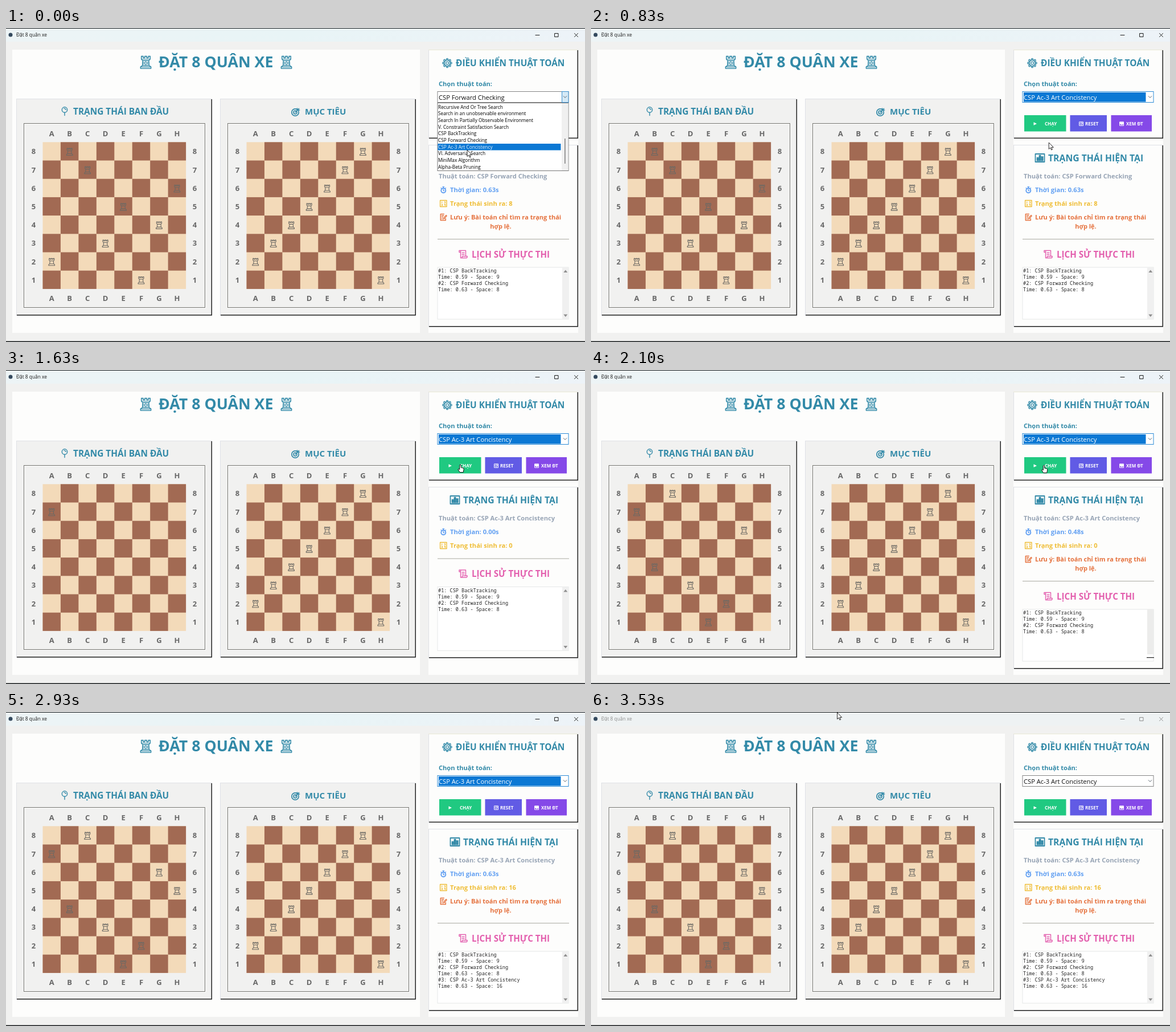
An HTML page for the animation above (3.56 s loop, 1017x551 px).

```html
<!DOCTYPE html>
<html lang="vi">
<head>
<meta charset="utf-8">
<title>Đặt 8 quân xe</title>
<style>
  html, body { margin: 0; width: 100%; height: 100%; overflow: hidden; background: #f1f1f0; }
  svg { display: block; width: 1017px; height: 551px; }
  text { font-family: "Open Sans", "Noto Sans", sans-serif; white-space: pre; }
  .b { font-weight: 700; }
  .m { font-family: "Noto Sans Mono", "DejaVu Sans Mono", monospace; }
  .icon { fill: none; stroke-width: 1.4; stroke-linejoin: round; stroke-linecap: round; }
</style>
</head>
<body>
<svg viewBox="0 0 1017 551">
  <defs>
    <linearGradient id="bar"><stop offset="0" stop-color="#edf4f6"/><stop offset=".5" stop-color="#e8f4f6"/><stop offset="1" stop-color="#edf3f8"/></linearGradient>
    <path id="rook" d="M-4.5-6.2V-3.2L-3.1-1.8L-3.4 3.2L-5.3 4.6V6.2H5.3V4.6L3.4 3.2L3.1-1.8L4.5-3.2V-6.2H2.6V-4.6H1V-6.2H-1V-4.6H-2.6V-6.2ZM-3.1-1.8H3.1M-3.4 3.2H3.4"/>
    <path id="bricks" d="M-4-3.2H4M-3.2 0H3.2M-3.3 1.6H3.3M0-1.8V0M-1.5 0V1.6M1.5 0V1.6M0 1.6V3.2M-4.5 4.7H4.5"/>
  </defs>
  <g id="scene"></g>
  <g id="cursor" fill="#fff" stroke="#111" stroke-width="1" stroke-linejoin="round">
    <path id="arrow" d="M0 0V11.5L2.7 9 4.4 13 6.2 12.2 4.5 8.4H8.1Z" stroke-width=".9"/>
    <path id="hand" d="M-1.2 1Q0-.8 1.2 1V5.2L5 6Q6.3 6.4 6.2 8L5.2 13.5H-.8L-3.8 8.8Q-3.6 7.2-2.2 7.8L-1.2 8.8Z"/>
  </g>
</svg>
<script>
const LOOP = 3560, OPEN_END = 700, RUN = 1630, STEP = 75, NOTE = 2070, REPAINT = 2150, DONE = 2235, BLUR = 3400;
const TEAL = "#338aa8", PINK = "#e35fae", GREY = "#686868", BLUE = "#62a0f2", GOLD = "#efbd35", ORANGE = "#e5713d";
const START = "28735146", GOAL = "23456781", FOUND = "74831265";
const ITEMS = ["Recursive And Or Tree Search", "Search in an unobservable environment",
  "Search In Partially Observable Environment", "V. Constraint Satisfaction Search", "CSP BackTracking",
  "CSP Forward Checking", "CSP Ac-3 Art Concistency", "VI. Adversarial Search", "MiniMax Algorithm", "Alpha-Beta Pruning"];
const OLD = ITEMS[5], NEW = ITEMS[6];

const rect = (x, y, w, h, fill) => `<rect x="${x}" y="${y}" width="${w}" height="${h}" fill="${fill}"/>`;
const text = (x, y, size, fill, str, cls = "", anchor = "start") =>
  `<text x="${x}" y="${y}" font-size="${size}" fill="${fill}" class="${cls}" text-anchor="${anchor}">${str}</text>`;
const bold = (x, y, size, fill, str, anchor) => text(x, y, size, fill, str, "b", anchor);
const icon = (x, y, color, body) => `<g class="icon" transform="translate(${x} ${y})" stroke="${color}">${body}</g>`;
const path = (d, extra = "") => `<path d="${d}" ${extra}/>`;
const circle = (x, y, r, extra = "") => `<circle cx="${x}" cy="${y}" r="${r}" ${extra}/>`;

// Raised box: pale top and left edges, dark right and bottom edges
function raised(x, y, w, h, fill) {
  return rect(x, y, w, h, "#dfe1e6") + rect(x + 1, y + 1, w - 1, h - 1, "#222") +
    rect(x + 1, y + 1, w - 2.5, h - 2.5, fill);
}

function groove(x, y, w, h) {
  return rect(x, y, w, h, "#fff") + rect(x, y, w - 1, h - 1, "#74746f") +
    rect(x + 1, y + 1, w - 3, h - 3, "#fff") + rect(x + 2, y + 2, w - 4, h - 4, "#f1f1f0");
}

function board(x0, rows, count) {
  const cw = 31.45, ch = 32.2, y0 = 200.3;
  let out = rect(x0, y0, cw * 8, ch * 8, "#f3dab9"), dark = "";
  for (let i = 0; i < 8; i++) {
    const cx = x0 + (i + .5) * cw, cy = y0 + (i + .5) * ch;
    for (let j = 0; j < 8; j++)
      if ((i + j) % 2) dark += rect(x0 + i * cw, y0 + j * ch, cw, ch, "#a26a53");
    for (const y of [189.6, 479]) out += bold(cx, y, 13, GREY, "ABCDEFGH"[i], "middle");
    for (const x of [x0 - 16, x0 + 267]) out += bold(x, cy + 5, 13, GREY, 8 - i, "middle");
  }
  out += dark;
  for (let i = 0; i < count; i++) {
    const x = x0 + (i + .5) * cw, y = y0 + (8.53 - rows[i]) * ch;
    out += icon(x, y, "#6b6964", `<use href="#rook" stroke-width="1.1"/>`);
  }
  return out;
}

function titleBar(active) {
  const ink = active ? "#1b1b1b" : "#8d8d8d";
  return rect(0, 0, 1017, 24, active ? "url(#bar)" : "#eef2f3") + rect(0, 0, 1017, 1, "#15181a") +
    rect(0, 549.5, 1017, 1.5, "#15181a") + circle(8, 12, 3.5, 'fill="#34495e"') +
    text(18, 15.2, 8.4, ink, "Đặt 8 quân xe") +
    icon(0, 0, ink, `<g stroke-width="1">${path("M930 12.5H937M964 9.5H970V15.5H964ZM998.5 9.5L1004.5 15.5M1004.5 9.5L998.5 15.5")}</g>`);
}

function leftSide(rows, count) {
  let out = rect(11, 38, 716, 497, "#fdfdfc");
  for (const x of [245.5, 492.5])
    out += icon(x, 60.3, TEAL, `<g transform="scale(1.72)" stroke-width=".9"><use href="#rook"/><use href="#bricks" stroke-width=".6"/></g>`);
  out += bold(368.7, 69.2, 26.7, TEAL, "ĐẶT 8 QUÂN XE", "middle");
  for (const x of [18, 376]) out += raised(x, 124, 344, 380.5, "#f1f1f0") + groove(x + 13, 167, 320, 325);
  out += icon(103, 146, TEAL, circle(0, -2.5, 4.7) + path("M0 2.5V7.5M-1-4.6Q1.8-5 2.2-2.5"));
  out += bold(118, 152, 15.4, TEAL, "TRẠNG THÁI BAN ĐẦU");
  out += icon(508.5, 147, TEAL, `<g stroke-width="1.7">${circle(-.5, 1, 6.2) + circle(-.5, 1, 3) + path("M-.5 1L6-5.5M3-6V-3H7")}</g>`);
  out += bold(525, 152, 15, TEAL, "MỤC TIÊU");
  return out + board(64.5, rows, count) + board(422.5, GOAL, 8);
}

function button(x, w, fill, textX, label, mark) {
  return rect(x, 153, w, 28.5, fill) + mark + bold(textX, 170.8, 8, "#fff", label);
}

function combo(mode) {
  const edge = mode === "picked" ? "#2d8bd6" : "#858585";
  let out = rect(757.5, 111, 231, 20, edge) + rect(758.5, 112, 229, 18, "#fff");
  if (mode === "picked") out += rect(760, 113, 214.5, 16.5, "#0b78d4");
  if (mode === "open") out += rect(976, 111, 12.5, 20, "#3a8fcf") + rect(977, 112, 10.5, 18, "#d5e9f6");
  return out + text(760, 125.8, 11.15, mode === "picked" ? "#fff" : "#111", mode === "open" ? OLD : NEW) +
    icon(982, 121, "#59636b", path("M-2.8-1.4L0 1.4 2.8-1.4", 'stroke-width="1"'));
}

function controls(mode) {
  let gear = circle(0, 0, 2.4) + circle(0, 0, 5.2);
  for (let a = 0; a < 360; a += 45) gear += circle(0, -6.6, 1.5, `transform="rotate(${a})"`);
  const chip = (x, inner) => icon(x, 167.8, "#fff", `<g stroke-width="1">${path("M-3-3H3.5V3.5H-3Z") + inner}</g>`);
  return raised(742, 38, 263, 156, "#fdfdfc") + rect(742, 38, 262, 1, "#e9e8d6") +
    icon(775, 61.5, TEAL, gear) + bold(790, 66.6, 15.4, TEAL, "ĐIỀU KHIỂN THUẬT TOÁN") +
    bold(760, 102.2, 11.1, TEAL, "Chọn thuật toán:") + combo(mode) +
    button(761, 73.5, "#20c981", 797, "CHẠY", path("M777.5 165.2L783 168 777.5 170.8Z", 'fill="#fff"')) +
    button(841.5, 64.5, "#615be5", 868, "RESET", chip(861, path("M1.8-1A2 2 0 1 0 1.8 1.2M2-1.5V0H.5"))) +
    button(913.5, 71.5, "#8549e8", 940, "XEM ĐT", chip(932, path("M-3-2H3.5V0L.5 2-3 0Z", 'fill="#fff"')));
}

function scrollBar(y, h, broken) {
  if (broken) return rect(977, y, 11.5, 79, "#ececeb") + rect(976, 504, 13, 1.2, "#222");
  return rect(977, y, 11.5, h, "#f0f0f0") +
    path(`M979.3 ${y + 9}H986.3L982.8 ${y + 4.5}ZM979.3 ${y + h - 8.5}H986.3L982.8 ${y + h - 4}Z`, 'fill="#8f8f8f"');
}

function status(s) {
  const dy = s.note ? 0 : -39.5, bottom = s.note ? 524.5 : 505.5, top = 420 + dy, boxH = s.note ? 92 : 113;
  let out = raised(742, 205, 263, bottom - 205, "#fdfdfc");
  out += icon(788.5, 228, TEAL, path("M-8-7H8V7H-8Z", 'stroke-width="1.8"') + path("M-5.5 5V-1H-2V5ZM-1.6 5V-5H1.8V5ZM2.4 5V-2.5H5.7V5Z", `fill="${TEAL}" stroke-width=".6"`));
  out += bold(803, 233.6, 15.75, TEAL, "TRẠNG THÁI HIỆN TẠI");
  out += bold(760, 264, 11.15, "#97a4b5", "Thuật toán: " + s.algo);
  out += icon(768.3, 284.3, BLUE, circle(0, 1, 4, 'stroke-width="1.9"') + path("M0-1V1.2H1.5M-1.3-5.5H1.3M0-5V-4M-4.2-3.6L-3.4-2.8M4.2-3.6L3.4-2.8"));
  out += bold(780, 288, 11.2, BLUE, `Thời gian: ${s.time}s`);
  out += icon(768.3, 308, GOLD, path("M-5.7-5.5H5.7V5.5H-5.7Z") + path("M-2.6-3.3V-.8M1.6-3.3H3.2V-.8H1.6M-3.3 1.3H-1.8V3.5H-3.3M2 1.3V2.5H3.4M3.4 1.3V3.7", 'stroke-width="1.1"'));
  out += bold(780, 312, 11.15, GOLD, `Trạng thái sinh ra: ${s.space}`);
  if (s.note) {
    out += icon(768.3, 332, ORANGE, path("M1-5.5H-5V5.5H4V2.5M-3-2.8H.5M-3-.3H-.8M-3 2.8H-1.5") + path("M4.8-3.5L.8 1 0 3.2 2 2.4 6-2.4Z", 'stroke-width="1.2"'));
    out += bold(780, 336, 11, ORANGE, "Lưu ý: Bài toán chỉ tìm ra trạng thái") + bold(869, 352, 11, ORANGE, "hợp lệ.", "middle");
  }
  out += rect(758, 370 + dy, 231, 1, "#aaa9a2");
  out += icon(803, 397 + dy, PINK, path("M-4.5-3.5H-7V-6.5H4.5V3.5M-4.5-6V6.5H6Q7.5 6 7.2 3.5H-1.5Q-1.5 6-3 6.5M-2-2.5H2M-2 .5H2"));
  out += bold(818, 402.6 + dy, 15.15, PINK, "LỊCH SỬ THỰC THI");
  out += rect(757.5, top - .5, 231, boxH, "#e6e7e8") + rect(758.5, top + .5, 229, boxH - 2, "#fff");
  const lines = ["#1: " + ITEMS[4], "Time: 0.59 - Space: 9", "#2: " + OLD, "Time: 0.63 - Space: 8"];
  if (s.done) lines.push("#3: " + NEW, "Time: 0.63 - Space: 16");
  lines.forEach((line, i) => out += text(759, top + 9.3 + i * 11, 8.55, "#222", line, "m"));
  return out + scrollBar(top, boxH - 1, s.broken);
}

function dropdown() {
  let out = rect(757.5, 131, 231, 120, "#777") + rect(758.5, 132, 229, 118, "#fff") +
    rect(976, 132, 11.5, 118, "#f0f0f0") + rect(981, 194, 1.6, 44, "#858585") +
    rect(758.5, 203, 216, 11.5, "#0b78d4");
  ITEMS.forEach((item, i) => out += text(759, 141.5 + i * 11.7, 8.3, i === 6 ? "#e8f3fc" : "#000", item));
  return out;
}

function stateAt(t) {
  const ran = t >= RUN, done = t >= DONE;
  const count = ran ? Math.min(8, 1 + Math.floor((t - RUN) / STEP)) : 8;
  return {
    mode: t < OPEN_END ? "open" : t < BLUR ? "picked" : "idle",
    active: t < BLUR, rows: ran ? FOUND : START, count, done,
    algo: ran ? NEW : OLD,
    time: !ran || done ? "0.63" : ((count - 1) * .08).toFixed(2),
    space: !ran ? 8 : done ? 16 : 0,
    note: !ran || t >= NOTE,
    broken: t >= NOTE && t < REPAINT
  };
}

const draw = s => rect(0, 0, 1017, 551, "#f1f1f0") + titleBar(s.active) + leftSide(s.rows, s.count) +
  rect(742, 38, 263, 497, "#fdfdfc") + controls(s.mode) + status(s) +
  (s.mode === "open" ? dropdown() : "");

// Pointer stops: time, x, y
const TRACK = [[0, 810, 214], [530, 806, 213], [720, 806, 213], [1080, 798, 160], [1230, 798, 160], [1600, 798, 166],
  [1680, 798, 166], [2050, 795.5, 167], [2200, 795.5, 167], [2630, 440, -12], [3230, 440, -12], [3520, 432.5, 1], [LOOP, 432.5, 1]];

function pointerAt(t) {
  const i = TRACK.findIndex(stop => stop[0] > t), a = TRACK[i - 1], b = TRACK[i];
  const p = (t - a[0]) / (b[0] - a[0]), e = p * p * (3 - 2 * p);
  return [a[1] + (b[1] - a[1]) * e, a[2] + (b[2] - a[2]) * e];
}

const $ = id => document.getElementById(id);
const begin = performance.now();
let shown = "";

function frame() {
  const t = (performance.now() - begin) % LOOP, s = stateAt(t), key = JSON.stringify(s);
  if (key !== shown) {
    $("scene").innerHTML = draw(s);
    shown = key;
  }
  const [x, y] = pointerAt(t);
  const overButton = s.mode !== "open" && x > 761 && x < 834 && y > 153 && y < 181;
  $("cursor").setAttribute("transform", `translate(${x.toFixed(2)} ${y.toFixed(2)})`);
  $("hand").style.display = overButton ? "" : "none";
  $("arrow").style.display = overButton ? "none" : "";
  requestAnimationFrame(frame);
}
frame();
</script>
</body>
</html>
```
